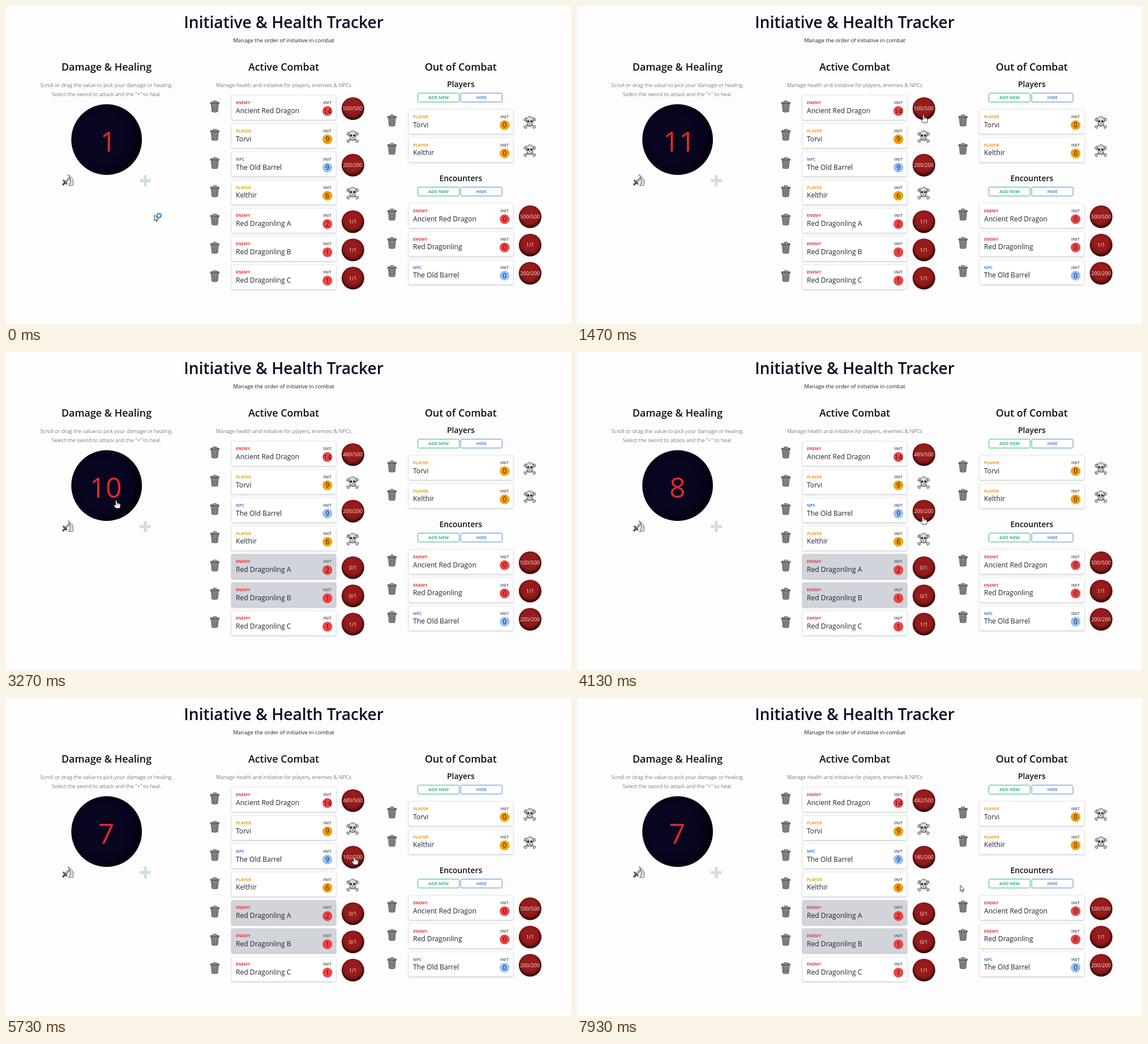
These frames come from a looping animation (998 px wide and 561 px high, 8 s). An HTML page with a canvas:

```html
<!DOCTYPE html>
<html lang="en">
<head>
<meta charset="utf-8">
<title>Initiative &amp; Health Tracker</title>
<style>
html, body { margin: 0; width: 100%; height: 100%; overflow: hidden; background: #fdfdfd; }
canvas { display: block; width: 998px; height: 561px; }
</style>
</head>
<body>
<canvas id="stage"></canvas>
<script>
const W = 998, H = 561, LOOP = 8000;
const canvas = document.getElementById('stage');
const dpr = window.devicePixelRatio || 1;
canvas.width = W * dpr;
canvas.height = H * dpr;
const c = canvas.getContext('2d');
const FONT = '"Open Sans", "Noto Sans", sans-serif';

const KINDS = {
  ENEMY: { label: '#e23c3c', badge: '#ef4343' },
  PLAYER: { label: '#f09c12', badge: '#f59e0b' },
  NPC: { label: '#3f7fd0', badge: '#93c0fb' }
};

// hp: [maximum, [time, value after a hit], ...]
const fighters = [
  { kind: 'ENEMY', name: 'Ancient Red Dragon', init: 14, hp: [500, [1650, 489], [6400, 482]] },
  { kind: 'PLAYER', name: 'Torvi', init: 9 },
  { kind: 'NPC', name: 'The Old Barrel', init: 9, hp: [200, [4350, 192], [5850, 185]] },
  { kind: 'PLAYER', name: 'Kelthir', init: 6 },
  { kind: 'ENEMY', name: 'Red Dragonling A', init: 2, hp: [1, [2200, 0]] },
  { kind: 'ENEMY', name: 'Red Dragonling B', init: 1, hp: [1, [2850, 0]] },
  { kind: 'ENEMY', name: 'Red Dragonling C', init: 1, hp: [1] }
];
const players = [
  { kind: 'PLAYER', name: 'Torvi', init: 0 },
  { kind: 'PLAYER', name: 'Kelthir', init: 0 }
];
const encounters = [
  { kind: 'ENEMY', name: 'Ancient Red Dragon', init: 0, hp: [500] },
  { kind: 'ENEMY', name: 'Red Dragonling', init: 0, hp: [1] },
  { kind: 'NPC', name: 'The Old Barrel', init: 0, hp: [200] }
];
const PITCH = 49.85, TOP = 157.4;
const DIAL = { x: 177.7, y: 235.6, r: 62.4 };
const ORB = { x: 214.8, y: 23.6, r: 20 };

// Pointer stops: time, x, y
const path = [
  [0, 262, 369], [70, 262, 369], [330, 190, 255], [1050, 186, 250],
  [1430, 612, 192], [1700, 612, 192], [2050, 616, 384], [2300, 616, 384],
  [2600, 618, 431], [2900, 618, 431], [3200, 195, 262], [3620, 192, 260],
  [4080, 611, 290], [4400, 611, 290], [4750, 192, 262], [5080, 190, 262],
  [5450, 680, 300], [5700, 615, 280], [6050, 615, 280], [6280, 614, 186],
  [6500, 614, 186], [6870, 633, 363], [7100, 600, 384], [7450, 520, 375],
  [7800, 453, 311], [7930, 677, 331], [LOOP, 677, 331]
];

function pointerAt(t) {
  const i = Math.max(1, path.findIndex(p => p[0] >= t));
  const [t0, x0, y0] = path[i - 1], [t1, x1, y1] = path[i];
  const u = (t - t0) / (t1 - t0), k = u * u * (3 - 2 * u);
  return [x0 + (x1 - x0) * k, y0 + (y1 - y0) * k];
}

function dialAt(t) {
  if (t >= 4900) return 7;
  if (t >= 3560) return 8;
  if (t >= 3400) return 9;
  if (t >= 3250) return 10;
  return Math.min(11, 1 + Math.max(0, Math.floor((t - 350) / 65)));
}

function healthAt([max, ...hits], t) {
  return hits.reduce((hp, [at, left]) => t >= at ? left : hp, max);
}

function text(str, x, y, size, weight, color, align = 'center') {
  c.font = `${weight} ${size}px ${FONT}`;
  c.textAlign = align;
  c.fillStyle = color;
  c.fillText(str, x, y);
}

function disc(x, y, r, fill) {
  c.beginPath();
  c.arc(x, y, r, 0, 7);
  c.fillStyle = fill;
  c.fill();
}

function oval(x, y, rx, ry, fill) {
  c.beginPath();
  c.ellipse(x, y, rx, ry, 0, 0, 7);
  c.fillStyle = fill;
  c.fill();
}

function box(x, y, w, h, r, fill, stroke) {
  c.beginPath();
  c.roundRect(x, y, w, h, r);
  if (fill) { c.fillStyle = fill; c.fill(); }
  if (stroke) { c.strokeStyle = stroke; c.lineWidth = 1; c.stroke(); }
}

function line(color, width, ...pts) {
  c.beginPath();
  for (let i = 0; i < pts.length; i += 2) c.lineTo(pts[i], pts[i + 1]);
  c.strokeStyle = color;
  c.lineWidth = width;
  c.stroke();
}

function shape(d, fill, stroke, width = 1) {
  const p = new Path2D(d);
  if (fill) { c.fillStyle = fill; c.fill(p); }
  if (stroke) { c.strokeStyle = stroke; c.lineWidth = width; c.stroke(p); }
}

function at(x, y, draw) {
  c.save();
  c.translate(x, y);
  c.lineCap = c.lineJoin = 'round';
  draw();
  c.restore();
}

function trash() {
  shape('M-6.4 5 L-5 19.3 Q0 21 5 19.3 L6.4 5Z', '#9a9a9a', '#484848', 1);
  for (const x of [-3.4, 0, 3.4]) line('#4a4a4a', 1.1, x, 7.5, x * 0.8, 18);
  box(-7.8, 2.6, 15.6, 2.8, 1.4, '#6a6a6a', '#444');
  shape('M-2.6 2.2 V0.5 H2.6 V2.2', null, '#484848', 1.1);
  line('#b5b5b5', 0.7, -6, 3.6, 5.5, 3.6);
}

function skull() {
  for (const [color, w, r] of [['#444', 2.8, 2], ['#d0d0d0', 1.4, 1.2]]) {
    for (const s of [-1, 1]) {
      line(color, w, -8 * s, -4.5, 8 * s, 8);
      for (const [x, y] of [[8.8, -4], [7.6, -6], [8.8, 7.6], [7.4, 9.3]]) disc(x * s, y, r, color);
    }
  }
  shape('M-6.3 -3 C-6.5 -12.4 6.5 -12.4 6.3 -3 C6.3 0.8 4.8 2 3.8 2.7 V6.2 Q0 8.4 -3.8 6.2 V2.7 C-4.8 2 -6.3 0.8 -6.3 -3Z',
    '#dadada', '#444', 1);
  oval(-2.8, -1.6, 1.9, 2.1, '#222');
  oval(2.8, -1.6, 1.9, 2.1, '#222');
  shape('M0 0.8 L-1.1 2.8 H1.1Z', '#222');
  for (const x of [-1.9, 0, 1.9]) line('#666', 0.7, x, 4.6, x, 6.4);
}

function sword() {
  shape('M9 -10.5 C17 -8 20.5 2 17.5 8 L10 8.5 C14.5 3 14 -5 9 -10.5Z', '#eef1f3', '#555', 0.9);
  shape('M12.5 -5 C15.5 -1 15 4.5 11 8.4', null, '#8a9298', 0.8);
  shape('M15.5 -3 C17.5 1 17 5 15 8', null, '#a9b0b5', 0.8);
  line('#222', 3.2, 5, 2, 11.5, -5);
  line('#e2e6e9', 1.6, 5, 2, 11.5, -5);
  line('#1e1610', 3, 0.5, 6.5, 4, 3);
  line('#a0521f', 1.3, 0.5, 6.5, 4, 3);
  line('#1e1610', 2.8, 1.2, -0.8, 6.6, 5);
  line('#d98a3a', 1.2, 1.2, -0.8, 6.6, 5);
}

function healthOrb(x, y, label) {
  const g = c.createRadialGradient(x - 0.5, y - 3, 12, x - 0.5, y - 2.5, 23);
  g.addColorStop(0, '#981b1b');
  g.addColorStop(0.35, '#891818');
  g.addColorStop(1, '#1c0303');
  disc(x, y, ORB.r, g);
  text(label, x - 0.2, y + 3.4, 9.2, 400, '#f3dfdf');
}

function row(f, x, y, t) {
  const kind = KINDS[f.kind];
  const hp = f.hp && healthAt(f.hp, t);
  at(x - 29.2, y + 9.7, trash);

  c.save();
  c.shadowColor = 'rgba(0,0,0,.2)';
  c.shadowBlur = 3 * dpr;
  c.shadowOffsetY = dpr;
  box(x, y, 185, 43.6, 2.5, hp === 0 ? '#d1d4da' : '#fff');
  c.restore();
  box(x + 0.2, y + 0.2, 184.6, 43.2, 2.5, null, 'rgba(0,0,0,.07)');

  text(f.kind, x + 8, y + 15.6, 7.3, 700, kind.label, 'left');
  text(f.name, x + 8, y + 31.4, 12.1, 400, '#20242b', 'left');
  text('INIT', x + 169.5, y + 15.6, 7.3, 700, '#686c72');
  disc(x + 169.7, y + 27.8, 8.6, kind.badge);
  text(f.init, x + 169.7, y + 32.1, 12, 400, '#2b2020');

  if (f.hp) healthOrb(x + ORB.x, y + ORB.y, `${hp}/${f.hp[0]}`);
  else at(x + 214.2, y + 22.9, skull);
}

function button(label, x, y, color) {
  box(x + 0.5, y + 0.5, 73, 15.6, 2, '#fff', color);
  text(label, x + 37, y + 11.1, 7.5, 700, color);
}

function group(title, y, list, firstRow, t) {
  text(title, 803.3, y, 13.9, 600, '#101010');
  button('ADD NEW', 727, y + 10, '#34b384');
  button('HIDE', 802.7, y + 10, '#4b88d6');
  list.forEach((f, i) => row(f, 711, firstRow + i * PITCH, t));
}

function dial(value) {
  const { x, y, r } = DIAL;
  const g = c.createRadialGradient(x - 9, y - 4, 36, x - 9, y - 4, 74);
  g.addColorStop(0, '#070520');
  g.addColorStop(0.55, '#06041b');
  g.addColorStop(1, '#000005');
  disc(x, y, r, g);
  c.font = `400 50px ${FONT}`;
  c.textAlign = 'left';
  c.fillStyle = '#dc2a2a';
  // Centre on the ink, since "1" sits off-centre in its advance width
  const m = c.measureText(value);
  c.fillText(value, x - 0.5 - (m.actualBoundingBoxRight - m.actualBoundingBoxLeft) / 2, 257);
}

function isHot(x, y) {
  if (Math.hypot(x - DIAL.x, y - DIAL.y) < DIAL.r) return true;
  return fighters.some((f, i) =>
    f.hp && Math.hypot(x - 398 - ORB.x, y - TOP - i * PITCH - ORB.y) < ORB.r);
}

function hand() {
  shape('M-1.2 1 Q0 -0.8 1.2 1 V5 Q2.6 4.2 3.4 5.4 Q4.8 4.8 5.5 6 Q7 5.6 7.3 7.2 V10.5 L6 14 H-0.8 L-4.2 9.2 Q-4 7.2 -2.4 8 L-1.2 9Z',
    '#fff', '#222', 0.9);
  line('#444', 0.6, 1.5, 6, 1.5, 8);
  line('#444', 0.6, 3.6, 6.2, 3.6, 8);
  line('#444', 0.6, 5.5, 6.8, 5.5, 8.2);
}

function arrow() {
  shape('M0 0 V10 L2.3 7.9 L4 11.6 L5.5 10.9 L3.9 7.3 H7Z', '#fff', '#222', 0.9);
}

function pointer(t) {
  const [x, y] = pointerAt(t);
  at(x, y, isHot(x, y) ? hand : arrow);
  if (t < 150) {
    c.beginPath();
    c.arc(x + 8.3, y + 0.8, 3.6, 0, 7);
    c.strokeStyle = '#3d97d6';
    c.lineWidth = 2.6;
    c.stroke();
  }
}

function draw(t) {
  c.setTransform(dpr, 0, 0, dpr, 0, 0);
  c.fillStyle = '#fdfdfd';
  c.fillRect(0, 0, W, H);

  text('Initiative & Health Tracker', 490.5, 38.6, 28.1, 600, '#0a0a24');
  text('Manage the order of initiative in combat', 490.5, 63.6, 9.57, 400, '#20202c');
  text('Damage & Healing', 177.5, 113.6, 17.9, 600, '#101010');
  text('Active Combat', 490.5, 113.6, 17.9, 600, '#101010');
  text('Out of Combat', 803.3, 113.6, 17.9, 600, '#101010');
  text('Scroll or drag the value to pick your damage or healing.', 177.5, 143, 9.5, 300, '#3c3c3c');
  text('Select the sword to attack and the "+" to heal.', 177.5, 159, 9.5, 300, '#3c3c3c');
  text('Manage health and initiative for players, enemies & NPCs', 490.5, 143, 9.4, 300, '#3c3c3c');

  dial(String(dialAt(t)));
  at(100.5, 308.5, sword);
  c.fillStyle = '#d0e0dc';
  c.fillRect(236, 305.3, 20, 5.4);
  c.fillRect(243.3, 298, 5.4, 20);

  fighters.forEach((f, i) => row(f, 398, TOP + i * PITCH, t));
  group('Players', 143.3, players, 182.2, t);
  group('Encounters', 309, encounters, 348.2, t);
  pointer(t);
}

function frame(now) {
  draw(now % LOOP);
  requestAnimationFrame(frame);
}
requestAnimationFrame(frame);
</script>
</body>
</html>
```
